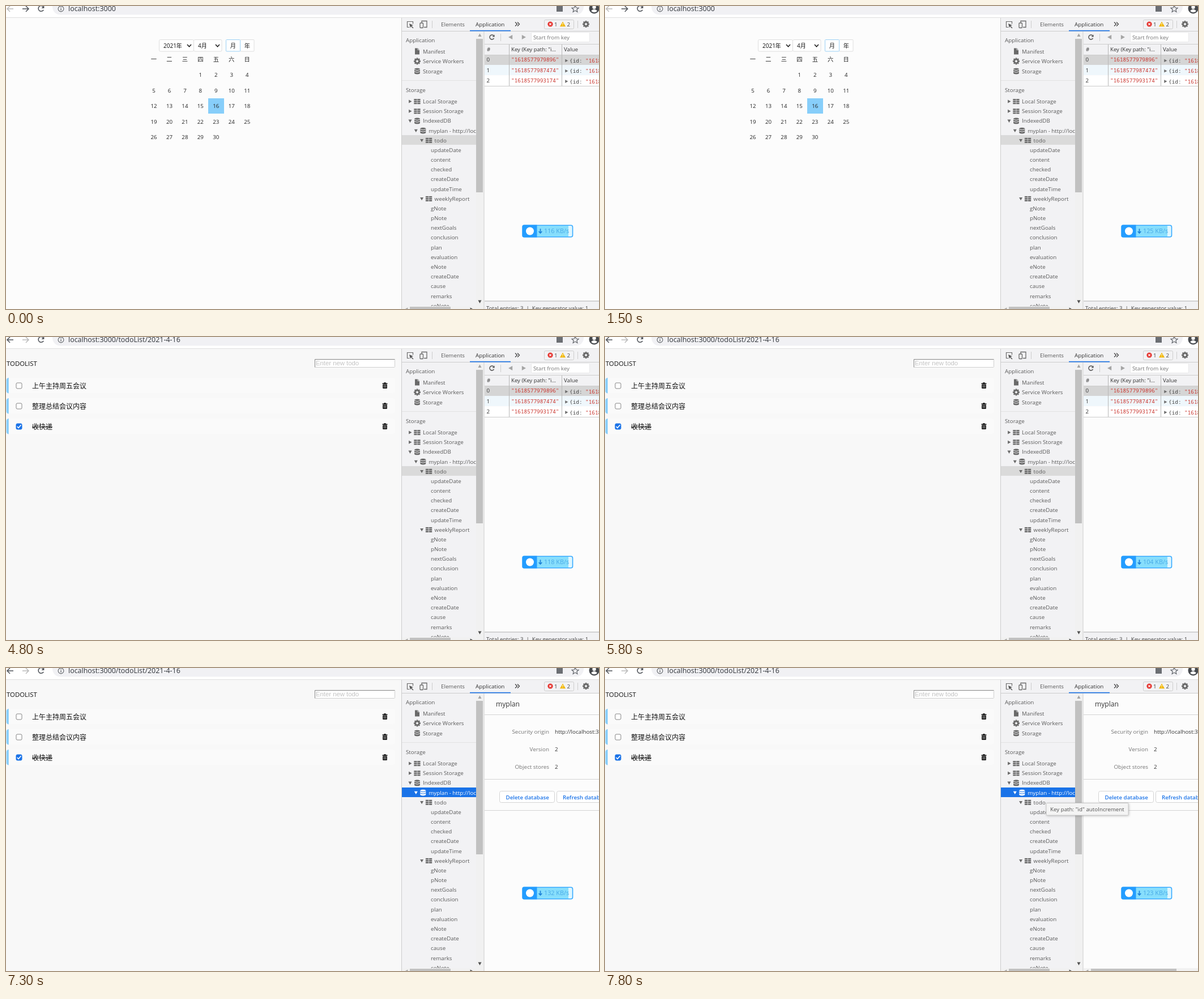
Animation of 1047x535 px, one loop 8 s. Source, as an HTML page with a canvas:

```html
<!DOCTYPE html>
<html lang="zh-CN">
<head>
<meta charset="utf-8">
<title>Planner</title>
<style>
html, body { margin: 0; width: 100%; height: 100%; overflow: hidden; background: #fcfcfc; }
canvas { display: block; }
</style>
</head>
<body>
<canvas id="stage" width="1047" height="535"></canvas>
<script>
const c = document.getElementById('stage').getContext('2d');
const SANS = '"Open Sans", "Noto Sans CJK SC", "Noto Sans CJK", sans-serif';
const MONO = '"Noto Sans Mono", monospace';
const BLUE = '#1a73e8', ICON = '#6a6a6a', LINE = '#cdcdcd', PANEL = '#f2f2f4', PAGE = '#fcfcfc';

function rect(x, y, w, h, color) {
  c.fillStyle = color;
  c.fillRect(x, y, w, h);
}
function box(x, y, w, h, r, fill, stroke, width = 1) {
  c.beginPath();
  c.roundRect(x, y, w, h, r);
  if (fill) { c.fillStyle = fill; c.fill(); }
  if (stroke) { c.strokeStyle = stroke; c.lineWidth = width; c.stroke(); }
}
function circle(x, y, r, fill) {
  c.beginPath();
  c.arc(x, y, r, 0, 7);
  c.fillStyle = fill;
  c.fill();
}
function path(d, x, y, color, width) {
  c.save();
  c.translate(x, y);
  const p = new Path2D(d);
  if (width) {
    c.strokeStyle = color;
    c.lineWidth = width;
    c.stroke(p);
  } else {
    c.fillStyle = color;
    c.fill(p);
  }
  c.restore();
}
function text(s, x, y, color = '#5a5a5a', size = 9.75, align = 'left', family = SANS, weight = 400) {
  c.font = `${weight} ${size}px ${family}`;
  c.textAlign = align;
  c.fillStyle = color;
  c.fillText(s, x, y);
}
function clipped(x, y, w, h, draw) {
  c.save();
  c.beginPath();
  c.rect(x, y, w, h);
  c.clip();
  draw();
  c.restore();
}

// Icons
function grid(x, y, color) {
  for (let i = 0; i < 6; i++)
    rect(x - 5.7 + (i % 2) * 6, y - 4.5 + Math.floor(i / 2) * 3.3, 5.3, 2.5, color);
}
function cylinder(x, y, color, gap) {
  path('M-5 -3.5C-5 -6 5 -6 5 -3.5V3.5C5 6 -5 6 -5 3.5Z', x, y, color);
  path('M-5 -2.6Q0 0 5 -2.6M-5 .8Q0 3.4 5 .8', x, y, gap, 1);
}
function gear(x, y, color) {
  for (let i = 0; i < 8; i++) {
    const a = i * Math.PI / 4;
    path(`M0 0L${6 * Math.cos(a)} ${6 * Math.sin(a)}`, x, y, color, 2.6);
  }
  circle(x, y, 4.6, color);
  circle(x, y, 2, PANEL);
}
function reload(x, y, r, color, width) {
  c.beginPath();
  c.arc(x, y, r, 0.5, 5.5);
  c.strokeStyle = color;
  c.lineWidth = width;
  c.stroke();
  path(`M${r + .6} ${-r - .6}V-.4H${r * .1}Z`, x, y, color);
}
function trash(x, y) {
  path('M-4.5 -3.8H4.5M-1.7 -5H1.7', x, y, '#111', 1.4);
  box(x - 3.9, y - 2.5, 7.8, 7.6, 1, '#111');
  path('M-1.9 -1.2V3.6M0 -1.2V3.6M1.9 -1.2V3.6', x, y, '#bbb', .8);
}
function triangle(x, y, dir, color, r = 3) {
  const d = {
    right: `M${-r * .8} ${-r}L${r} 0L${-r * .8} ${r}Z`,
    left: `M${r * .8} ${-r}L${-r} 0L${r * .8} ${r}Z`,
    down: `M${-r} ${-r * .8}H${r}L0 ${r}Z`,
    up: `M${-r} ${r * .8}H${r}L0 ${-r}Z`
  };
  path(d[dir], x, y, color);
}

function browserBar(todo) {
  rect(0, 0, 1047, 20, '#fff');
  rect(0, 20, 1047, 1, '#dedede');
  box(82, -14, 938, 29.5, 14, '#f1f1f4');
  path('M6 0H-5M0 -5L-5 0L0 5', 7, 5, todo ? '#50545a' : '#bbb', 1.5);
  path('M-6 0H5M0 -5L5 0L0 5', 35, 5, todo ? '#bbb' : '#50545a', 1.5);
  reload(62, 4.5, 4.8, '#50545a', 1.6);
  c.beginPath();
  c.arc(97, 5, 4.9, 0, 7);
  c.strokeStyle = '#5f6368';
  c.lineWidth = 1.1;
  c.stroke();
  rect(96.4, 4.3, 1.3, 3.5, '#5f6368');
  rect(96.4, 2, 1.3, 1.3, '#5f6368');
  text('localhost:3000' + (todo ? '/todoList/2021-4-16' : ''), 110, 9, '#30343a', 12.45);
  rect(972, 0, 11, 10, '#6b6e73');
  path('M0 -6L1.7 -2L6 -1.6L2.8 1.2L3.8 5.4L0 3.1L-3.8 5.4L-2.8 1.2L-6 -1.6L-1.7 -2Z', 1005, 5, '#5f6368', 1.2);
  circle(1038.5, 4.5, 9, '#46494d');
  circle(1038.5, 2, 3.2, '#fff');
  path('M-5.5 0Q0 -6 5.5 0Q0 5 -5.5 0Z', 1038.5, 8.8, '#fff');
}

function calendar(hover) {
  rect(0, 21, 699, 514, PAGE);
  box(270.5, 59.5, 61, 20.5, 2, '#fff', '#dedede');
  box(331.5, 59.5, 49.5, 20.5, 2, '#fff', '#dedede');
  box(413.5, 59.5, 24.5, 20.5, 1, '#fff', '#dedede');
  box(388.5, 59.5, 25, 20.5, 1, '#fff', '#9bd0f5');
  text('2021年', 278, 73.5, '#111', 10);
  text('4月', 339, 73.5, '#111', 10);
  for (const x of [323.5, 373.5]) path('M-3.5 -2L0 1.8L3.5 -2', x, 70, '#222', 1.6);
  text('月', 401, 73.5, '#222', 10.3, 'center');
  text('年', 426, 73.5, '#222', 10.3, 'center');
  const column = i => 261 + 27.45 * i;
  [...'一二三四五六日'].forEach((s, i) => text(s, column(i), 98, '#222', 10.3, 'center'));
  rect(357, 163, 28, 27, '#87cefa');
  if (hover) rect(412, 163, 27, 27, '#fff');
  for (let day = 1; day <= 30; day++) {
    const cell = day + 2;
    text(day, column(cell % 7), 125.4 + 27.4 * Math.floor(cell / 7), '#222', 9.7, 'center');
  }
}

function todoList() {
  rect(0, 21, 699, 514, '#f8f8f8');
  text('TODOLIST', 1, 51.3, '#111', 11.4);
  box(545.5, 39.5, 141, 14, 1, '#fff', '#cfcfcf');
  path('M0 14V0H141', 545.5, 39.5, '#858585', 1);
  text('Enter new todo', 547, 50.3, '#c3c3c3', 11.3, 'left', '"Liberation Sans", sans-serif');
  ['上午主持周五会议', '整理总结会议内容', '收快递'].forEach((s, i) => {
    const y = 86 + 36 * i, done = i === 2;
    const row = color => box(.7, y - 14, 686, 27.5, 4.3, color);
    row('#fafafa');
    clipped(0, y - 14, 4.8, 28, () => row('#87cefa'));
    box(18, y - 5, 10, 10, 2, done ? BLUE : '#fff', done ? BLUE : '#858585');
    if (done) path('M-3.3 0L-1 2.5L3.5 -2.7', 23, y, '#fff', 1.6);
    text(s, 46, y + 5.3, '#111', 12);
    if (done) rect(46, y + .5, 36, 1, '#111');
    trash(669, y);
  });
}

function toolbar(gearColor) {
  rect(699, 21, 348, 23, PANEL);
  path('M10 4V0H0V10H4', 708.5, 27.5, ICON, 1.2);
  path('M0 0L7 3L4 4L7.5 7.5L6.5 8.5L3 5L2 7.5Z', 712, 31, '#555');
  path('M3 3V0H12V11H7', 731, 26.5, ICON, 1.3);
  box(731, 30, 5.5, 8.5, 1, PANEL, ICON, 1.3);
  rect(752, 26, 1, 13, LINE);
  text('Elements', 768, 36);
  text('Application', 829, 36, '#333', 9.85);
  rect(699, 44, 348, 1, LINE);
  rect(819, 42.8, 72, 1.6, BLUE);
  path('M0 -3.5L3.5 0L0 3.5M4 -3.5L7.5 0L4 3.5', 899, 32, '#444', 1.3);
  box(950.5, 24.5, 52, 16, 2, null, LINE);
  circle(961, 32, 4.6, '#e5322d');
  path('M-1.8 -1.8L1.8 1.8M1.8 -1.8L-1.8 1.8', 961, 32, '#fff', 1.2);
  text('1', 968, 36, '#444');
  path('M0 -4.5L5 4.3H-5Z', 983, 32, '#f2b600');
  rect(982.5, 30, 1, 3, '#fff');
  rect(982.5, 34, 1, 1, '#fff');
  text('2', 990.5, 36, '#444');
  rect(1009, 26, 1, 13, LINE);
  gear(1024, 32, gearColor);
}

const TREE = [
  ['Local Storage', 0, 0, grid, 'right'],
  ['Session Storage', 1, 0, grid, 'right'],
  ['IndexedDB', 2, 0, cylinder, 'down'],
  ['myplan - http://localhost:3000', 3, 10.3, cylinder, 'down'],
  ['todo', 4, 20.6, grid, 'down'],
  ['weeklyReport', 10, 20.6, grid, 'down']
];
const FIELDS = [
  [5, 'updateDate content checked createDate updateTime'],
  [11, 'gNote pNote nextGoals conclusion plan evaluation eNote createDate cause remarks coNote']
];
function sidebar(selected, focused) {
  rect(699, 45, 145, 490, PANEL);
  text('Application', 706, 63.6, '#5a5a5a', 9.85);
  path('M-4 -5.5H1L4 -2.5V5.5H-4Z', 726, 80, ICON);
  path('M1 -5.5V-2.5H4', 726, 80, PANEL, .8);
  gear(726, 97.5, ICON);
  cylinder(726, 115, ICON, PANEL);
  ['Manifest', 'Service Workers', 'Storage'].forEach((s, i) => text(s, 736, 84 + 17.3 * i));
  rect(699, 131, 131, 1, '#e2e2e2');
  text('Storage', 706, 151.8);

  const rowY = i => 168.6 + 17.17 * i;
  clipped(699, 45, 131, 485, () => {
    for (const [s, i, indent, icon, dir] of TREE) {
      const y = rowY(i), active = i === selected, lit = active && focused;
      const back = lit ? BLUE : active ? '#dadada' : PANEL;
      if (active) rect(699, Math.round(y - 9), 131, 17, back);
      triangle(713.5 + indent, y, dir, lit ? '#fff' : ICON);
      icon(726 + indent, y, lit ? '#fff' : ICON, back);
      text(s, 736 + indent, y + 3.5, lit ? '#fff' : '#5a5a5a');
    }
    for (const [first, names] of FIELDS)
      names.split(' ').forEach((s, i) => text(s, 750, rowY(first + i) + 3.5));
  });

  rect(830, 45, 14, 485, '#f1f1f1');
  rect(830, 58, 12, 271, '#c1c1c1');
  triangle(836.5, 51.5, 'up', '#a3a3a3', 3);
  triangle(836.5, 522, 'down', '#505050', 3);
  rect(699, 530, 145, 5, '#f1f1f1');
  rect(713, 531, 72, 4, '#c1c1c1');
  triangle(707, 535.5, 'left', '#a3a3a3');
  triangle(822, 535.5, 'right', '#505050');
  rect(843.5, 45, 1, 490, LINE);
  rect(698, 21, 1, 514, LINE);
}

function records() {
  rect(845, 45, 202, 490, PAGE);
  rect(845, 45, 202, 41, PANEL);
  reload(858, 55, 4, '#555', 1.5);
  rect(873, 49, 1, 13, LINE);
  triangle(891, 55, 'left', '#a5a5a5', 4);
  triangle(914, 55, 'right', '#a5a5a5', 4);
  box(927.5, 46.5, 103, 17, 2, '#fff', '#e8e8e8');
  text('Start from key', 931, 59.3, '#757575');
  rect(845, 67, 202, 1, LINE);
  text('#', 849, 80, '#333');
  text('Key (Key path: "i…', 892, 80, '#333', 9.6);
  text('Value', 985, 80, '#333');
  ['1618577979896', '1618577987474', '1618577993174'].forEach((key, i) => {
    const y = 95 + 18.3 * i;
    rect(845, Math.round(y - 9), 202, 18, ['#d5d5d5', '#eff7fc', '#fff'][i]);
    text(i, 848.5, y + 3.2, '#333');
    text(`"${key}"`, 892, y + 3.3, '#c9322b', 9.4, 'left', MONO);
    triangle(989.5, y + 1.5, 'right', '#6e6e6e', 2.8);
    text('{id: ', 995, y + 5, '#444', 9.4, 'left', MONO);
    text(`"${key}"`, 1023, y + 5, '#c9322b', 9.4, 'left', MONO);
  });
  rect(845, 86, 202, 1, LINE);
  rect(845, 141, 202, 1, LINE);
  rect(888, 68, 1, 73, '#b8b8b8');
  rect(981, 68, 1, 73, '#b8b8b8');
  rect(845, 521, 202, 14, PANEL);
  rect(845, 520.5, 202, 1, '#b0b0b0');
  text('Total entries: 3  |  Key generator value: 1', 848, 536.5, '#444', 9.6);
}

function database(scrollbar) {
  rect(845, 45, 202, 490, PAGE);
  text('myplan', 865, 68, '#333', 12.1);
  for (const y of [82, 196, 251]) rect(845, y, 202, 1, '#d4d4d4');
  const facts = [['Security origin', 'http://localhost:3000'], ['Version', 2], ['Object stores', 2]];
  facts.forEach(([name, value], i) => {
    const y = 115.5 + 31 * i;
    text(name, 959, y, '#757575', 9.85, 'right');
    text(value, 969, y, '#333');
  });
  box(871.5, 217.5, 97, 20, 3, '#fff', '#d4d4d4');
  box(972.5, 217.5, 108, 20, 3, '#fff', '#d4d4d4');
  text('Delete database', 882.5, 231.5, BLUE, 9.75, 'left', SANS, 600);
  text('Refresh database', 983, 231.5, BLUE, 9.75, 'left', SANS, 600);
  if (!scrollbar) return;
  rect(845, 530, 202, 5, '#f1f1f1');
  rect(858, 531, 151, 4, '#c1c1c1');
  triangle(851, 535.5, 'left', '#a3a3a3');
}

function speedBadge(speed) {
  box(912.2, 387.2, 88.3, 20.6, 3, '#dff6ff', '#37aaff', 1.6);
  rect(937, 388, 56, 19, '#87defc');
  box(911.5, 386.5, 26, 22, [3, 0, 0, 3], '#249dff');
  circle(925, 397.5, 7, '#fff');
  path('M0 -4V3.5M-2.8 .7L0 3.7L2.8 .7', 943.5, 397.3, '#1d82d8', 1.7);
  text(speed + ' KB/s', 950, 401.3, '#48a9e6', 10.8);
}

function tooltip(alpha) {
  c.save();
  c.globalAlpha = alpha;
  c.shadowColor = '#0004';
  c.shadowBlur = 4;
  c.shadowOffsetX = c.shadowOffsetY = 1;
  box(779, 238.5, 145, 21.5, 1, '#f4f4f4');
  c.shadowColor = 'transparent';
  box(779, 238.5, 145, 21.5, 1, null, '#c8c8c8');
  text('Key path: "id" autoIncrement', 786, 253, '#505050');
  c.restore();
}

const SPEEDS = [[0, 116], [600, 125], [1700, 113], [2700, 126], [3700, 121],
  [4800, 118], [5800, 104], [6800, 132], [7800, 123]];

function draw(t) {
  const within = (from, to) => t >= from && t < to;
  const todo = t >= 1600, db = t >= 7300;
  c.clearRect(0, 0, 1047, 535);
  browserBar(todo);
  if (todo) todoList();
  else calendar(within(1400, 1500));
  toolbar(within(200, 300) ? '#333' : ICON);
  if (db) database(t >= 7400);
  else records();
  sidebar(db ? 3 : 4, within(1400, 1500) || t >= 6500);
  speedBadge(SPEEDS.findLast(([start]) => t >= start)[1]);
  if (t >= 7600) tooltip(t < 7700 ? .4 : t < 7800 ? .8 : 1);
}

const start = performance.now();
function tick() {
  draw((performance.now() - start) % 8000);
  requestAnimationFrame(tick);
}
tick();
</script>
</body>
</html>
```
